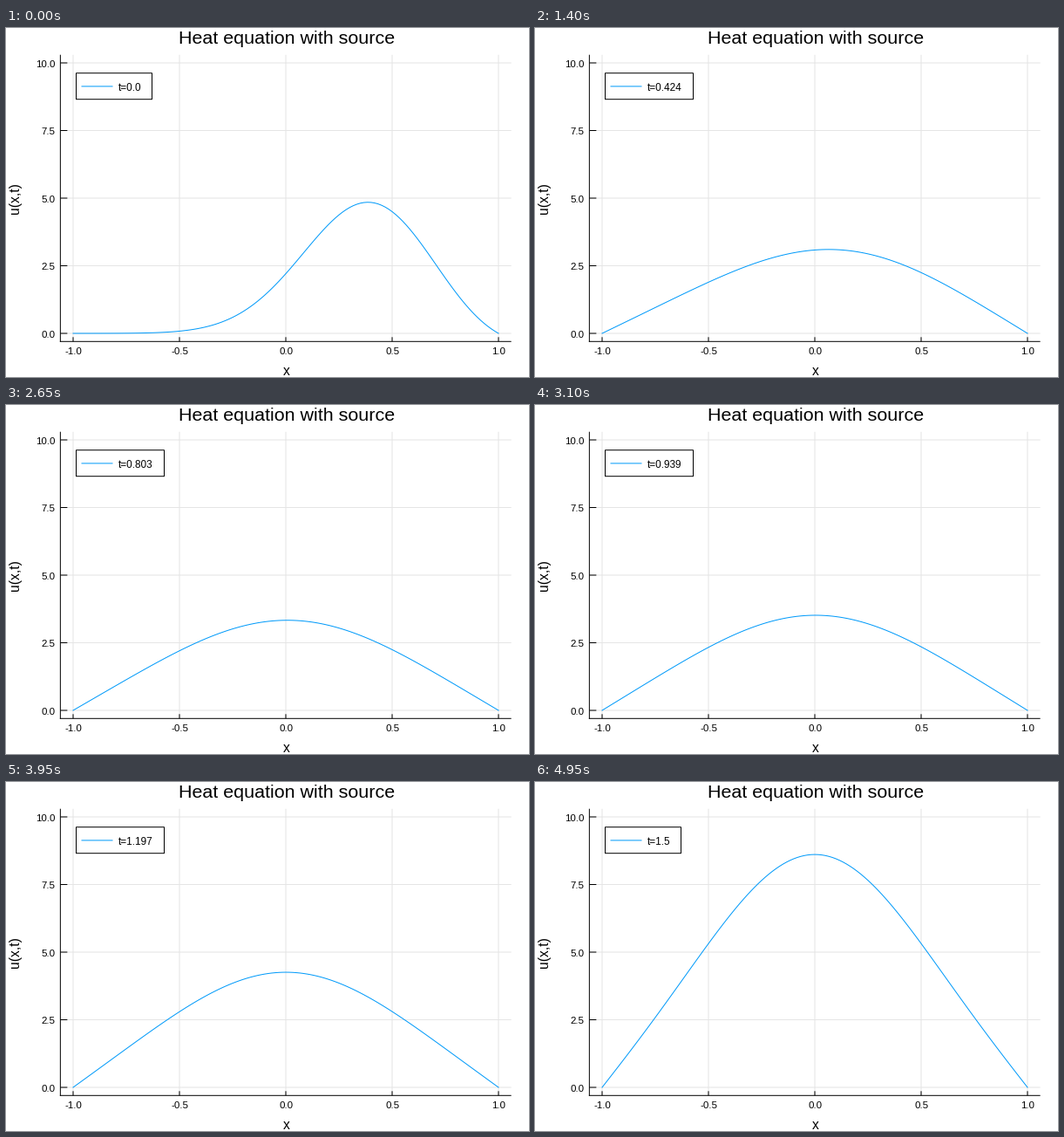
These frames come from a looping animation (600 by 400 pixels, 5000 ms). A matplotlib script:

```python
import numpy as np
import matplotlib.pyplot as plt
from matplotlib.animation import FuncAnimation
from matplotlib.patches import Rectangle

W, H, DPI = 600, 400, 100
FRAMES, INTERVAL = 100, 50
T_END = 1.5
SUBSTEPS = 12
CELLS = 120
END_PEAK = 8.61

BLUE, GRID = "#009afa", "#e5e5e5"
PIXEL = 72 / DPI  # one pixel in points

plt.rcParams["font.family"] = "Liberation Sans"


# --- Heat equation u_t = u_xx + k u^2, u(-1) = u(1) = 0 ---

x = np.linspace(-1, 1, CELLS + 1)
start = 6 * (1 - x**2) * np.exp(-4 * (x - 0.5) ** 2)
dt = T_END / (FRAMES - 1) / SUBSTEPS

modes = np.arange(1, CELLS)
sines = np.sqrt(2 / CELLS) * np.sin(np.pi * np.outer(modes, modes) / CELLS)
diffuse = (sines * np.exp(-((modes * np.pi / 2) ** 2) * dt)) @ sines


def solve(k):
    """Strang splitting; returns one profile per frame, or None on blow-up."""
    u = start[1:-1].copy()
    profiles = [start]
    half = k * dt / 2
    for _ in range(FRAMES - 1):
        for _ in range(SUBSTEPS):
            u = u / (1 - half * u)
            u = diffuse @ u
            u = u / (1 - half * u)
            if u.max() > 60:
                return None
        profiles.append(np.concatenate(([0], u, [0])))
    return profiles


def tune():
    """Find the source strength that ends at the wanted peak."""
    low, high = 0.9, 1.1
    best = solve(low)
    for _ in range(22):
        mid = (low + high) / 2
        result = solve(mid)
        if result is None or result[-1].max() > END_PEAK:
            high = mid
        else:
            low, best = mid, result
    return best


profiles = tune()


# --- Stage in pixel coordinates, y pointing down ---

fig = plt.figure(figsize=(W / DPI, H / DPI), dpi=DPI, facecolor="white")
ax = fig.add_axes([0, 0, 1, 1])
ax.set_xlim(0, W)
ax.set_ylim(H, 0)
ax.axis("off")


def px(v):
    return 321 + 244 * v


def py(v):
    return 350 - 31 * v


def line(x0, y0, x1, y1, color="black", z=2):
    ax.plot([x0, x1], [y0, y1], color=color, lw=PIXEL, snap=False,
            solid_capstyle="butt", zorder=z)


def text(x0, y0, s, size, ha="center", **kw):
    return ax.text(x0, y0, s, fontsize=size * PIXEL, ha=ha,
                   va="baseline", color="black", zorder=6, **kw)


LEFT, RIGHT = px(-1.06), px(1.06)
TOP, BOTTOM = py(10.3), py(-0.3)

for v in (-1.0, -0.5, 0.0, 0.5, 1.0):
    line(px(v), TOP, px(v), BOTTOM, GRID, 1)
    line(px(v), BOTTOM, px(v), BOTTOM - 5)
    text(px(v) + 0.2, 374.5, f"{v:.1f}", 11.5)

for v in (0.0, 2.5, 5.0, 7.5, 10.0):
    line(LEFT, py(v), RIGHT, py(v), GRID, 1)
    line(LEFT, py(v), LEFT + 8, py(v))
    text(56.8, py(v) + 4.6, f"{v:.1f}", 11.5, ha="right")

line(LEFT, TOP, LEFT, BOTTOM + 0.5)
line(LEFT - 0.5, BOTTOM, RIGHT, BOTTOM)

text(322.2, 18, "Heat equation with source", 21.5)
text(321.8, 398, "x", 15.6)
text(14.6, 195.5, "u(x,t)", 15.6, rotation=90, rotation_mode="anchor")

curve, = ax.plot(px(x), py(start), color=BLUE, lw=PIXEL, zorder=3)

box = Rectangle((80.5, 51.7), 87, 30, fc="white", ec="black",
                lw=PIXEL, snap=False, zorder=4)
ax.add_patch(box)
line(86.5, 66.9, 122.5, 66.9, BLUE, 5)
label = text(128.5, 72, "", 11.8, ha="left")


def draw(i):
    name = f"t={round(T_END * i / (FRAMES - 1), 3)}"
    curve.set_ydata(py(profiles[i]))
    label.set_text(name)
    box.set_width(87 + 7 * (len(name) - 5))
    return curve, label, box


anim = FuncAnimation(fig, draw, frames=FRAMES, interval=INTERVAL,
                     repeat=True, repeat_delay=0)
plt.show()
```
